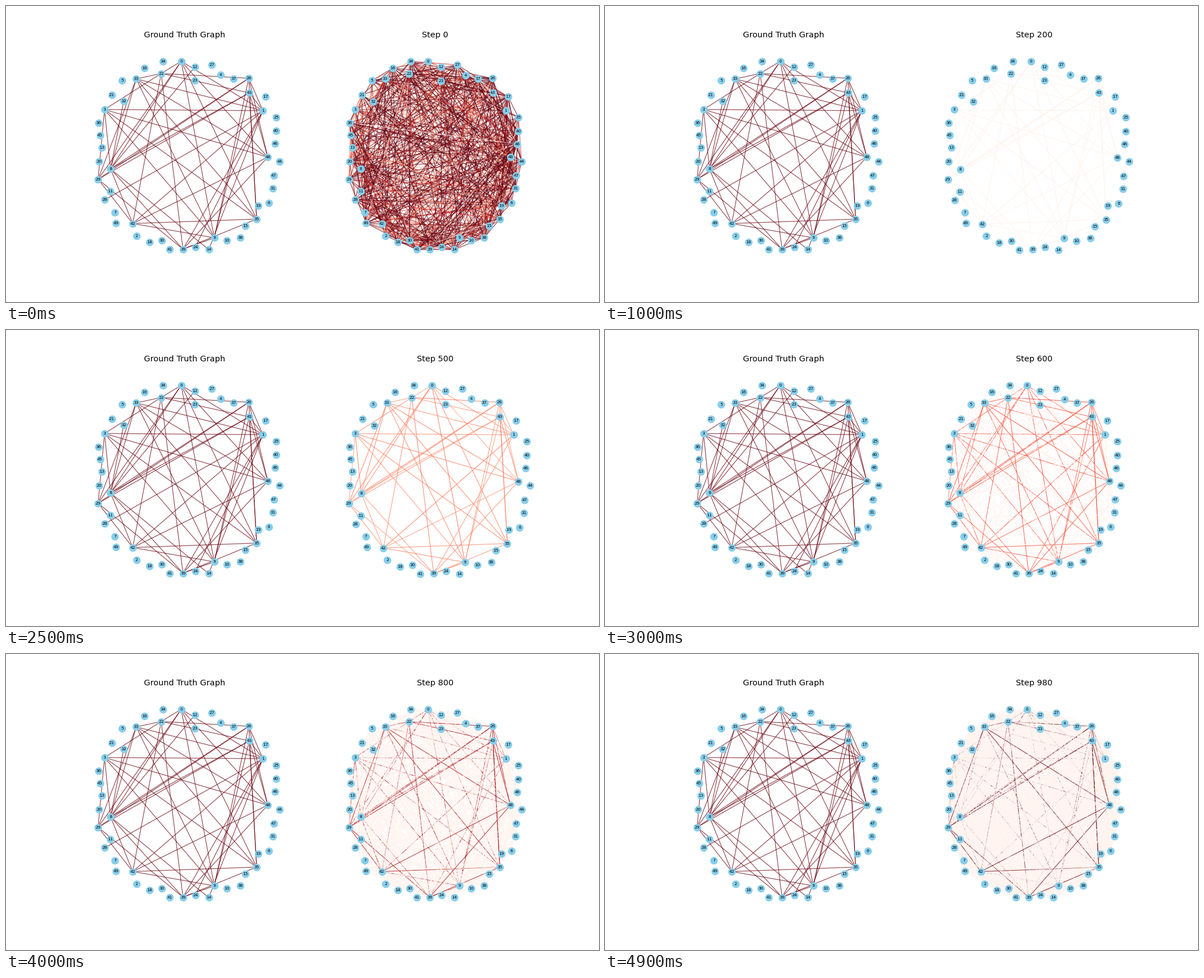
Write a matplotlib script that moves like this. It is 1058 px wide and 529 px high and loops after 5 s.

```python
import matplotlib.pyplot as plt
import numpy as np
from matplotlib.animation import FuncAnimation
from matplotlib.collections import LineCollection

NODES, FRAMES, STEP = 50, 50, 20
ALPHA = 0.7
REDS = plt.get_cmap("Reds")

# The learned graph is complete bipartite between two groups of hubs.
GROUP_A = (1, 8, 9, 22, 29, 35, 48)
GROUP_B = (0, 3, 26, 33, 39, 42, 43)
EXTRA = [(8, 12), (8, 14), (8, 32), (1, 14), (1, 24), (1, 28)]


def spring_layout(n, rounds=50):
    """Force-directed layout with repulsion only (no springs)."""
    pos = np.random.RandomState(42).rand(n, 2)
    heat = 0.1 * np.ptp(pos, axis=0).max()
    cool = heat / (rounds + 1)
    for _ in range(rounds):
        delta = pos[:, None] - pos[None]
        dist = np.maximum(np.linalg.norm(delta, axis=-1), 0.01)
        push = np.einsum("ijk,ij->ik", delta, 1 / (n * dist**2))
        size = np.maximum(np.linalg.norm(push, axis=-1), 0.01)
        pos += push * (heat / size)[:, None]
        heat -= cool
    return pos


POS = spring_layout(NODES)
pairs = np.column_stack(np.triu_indices(NODES, 1))
learned = {(min(a, b), max(a, b)) for a in GROUP_A for b in GROUP_B}
truth = np.array(sorted(learned) + EXTRA)
is_true = np.array([tuple(p) in learned for p in pairs.tolist()])

rng = np.random.default_rng(7)
start = np.minimum(2 * rng.normal(size=len(pairs)), 1.6)
rank = rng.random(len(pairs))
spread = rng.normal(size=len(pairs))
born = rng.uniform(4.5, 7, len(pairs))


def weights(k):
    """Edge weights at frame k; zero or less means not drawn."""
    if k < 3:
        return start - 0.7 * k
    step = k * STEP
    g = np.interp(step, [120, 250, 360, 600, 800, 980],
                  [0, 0.04, 0.22, 0.57, 0.87, 1])
    w_true = np.clip(g + 0.3 * spread * g * (1 - g) ** 2, 0.003, 1)
    w_true = np.where(k >= born, w_true, 0)
    share = np.interp(step, [540, 600, 800, 980], [0, 0.12, 0.45, 0.9])
    if k % 6 == 2:      # spurious edges vanish now and then
        share = 0
    w_noise = np.where(rank < share, 0.004, 0)
    return np.where(is_true, w_true, w_noise)


def fit_view(ax, segs):
    """Limits around all nodes, padded around the drawn edges."""
    lo, hi = POS.min(0), POS.max(0)
    if len(segs):
        pts = segs.reshape(-1, 2)
        a, b = pts.min(0), pts.max(0)
        pad = 0.05 * (b - a)
        lo, hi = np.minimum(lo, a - pad), np.maximum(hi, b + pad)
    m = 0.05 * (hi - lo)
    ax.set_xlim(lo[0] - m[0], hi[0] + m[0])
    ax.set_ylim(lo[1] - m[1], hi[1] + m[1])


def make_panel(ax, title):
    ax.axis("off")
    ax.set_title(title, fontsize=11.8)
    ax.scatter(*POS.T, s=100, c="skyblue", zorder=2)
    for i, (x, y) in enumerate(POS):
        ax.text(x, y, str(i), fontsize=6, ha="center", va="center", zorder=3)
    lines = LineCollection([], linewidths=1, zorder=1)
    ax.add_collection(lines, autolim=False)
    return lines


def show_edges(ax, lines, ends, w):
    segs = POS[ends]
    lines.set_segments(list(segs))
    lines.set_color(REDS(w, alpha=ALPHA))
    fit_view(ax, segs)


plt.rcParams["font.family"] = "DejaVu Sans"
fig, (left, right) = plt.subplots(1, 2, figsize=(12, 6), dpi=1058 / 12)
true_lines = make_panel(left, "Ground Truth Graph")
show_edges(left, true_lines, truth, np.ones(len(truth)))
step_lines = make_panel(right, "Step 0")


def update(k):
    w = weights(k)
    on = w > 0
    show_edges(right, step_lines, pairs[on], np.clip(w[on], 0, 1))
    right.title.set_text(f"Step {k * STEP}")
    return ()


anim = FuncAnimation(fig, update, frames=FRAMES, interval=100, repeat=True)
plt.show()
```
